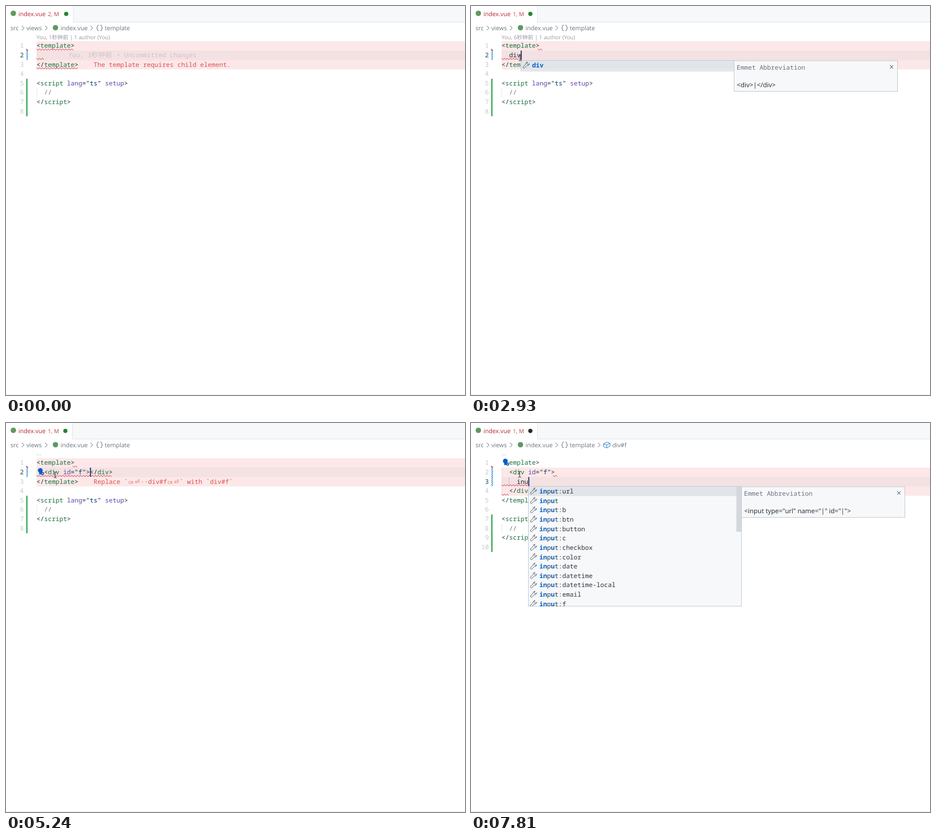
These frames come from a looping animation (812 px wide and 690 px high, 8000 ms). An HTML page:

```html
<!DOCTYPE html>
<html lang="en">
<head>
<meta charset="utf-8">
<title>Typing an abbreviation in an editor</title>
<style>
html, body { margin: 0; width: 100%; height: 100%; overflow: hidden; background: #fff; }
svg { display: block; width: 812px; height: 690px; text-rendering: geometricPrecision; }
text { white-space: pre; }
.code { font: 11.23px "Noto Sans Mono", "Noto Sans CJK SC", monospace; fill: #24292e; }
.ui { font: 10.7px "Open Sans", "Noto Sans CJK SC", sans-serif; fill: #6a737d; }
.tag { fill: #1b7040; } .attr { fill: #5f45b0; } .str { fill: #032f62; } .note { fill: #6a737d; }
.hit { fill: #005cc5; font-weight: 700; }
</style>
</head>
<body>
<svg id="stage" viewBox="0 0 812 690"></svg>
<script>
const LOOP = 8000, LEFT = 54, CW = 6.738, LH = 16.63;
const X = col => LEFT + col * CW;
const Y = row => 62.5 + (row - 1) * LH;
const base = row => Math.round(Y(row) + 11.8);
const esc = s => s.replace(/</g, '&lt;');

const rect = (x, y, w, h, fill, more = '') =>
  `<rect x="${x}" y="${y}" width="${w}" height="${h}" fill="${fill}" ${more}/>`;
const line = (d, stroke, w = 1) => `<path d="${d}" fill="none" stroke="${stroke}" stroke-width="${w}"/>`;
const dot = (x, y, r, fill) => `<circle cx="${x}" cy="${y}" r="${r}" fill="${fill}"/>`;
const text = (x, y, s, cls, more = '') => `<text x="${x}" y="${y}" class="${cls}" ${more}>${s}</text>`;
const ink = (color, size) => `style="fill:${color}${size ? `;font-size:${size}px` : ''}"`;

// Suggestion lists
const D_ITEMS = 'div dd del details dfn dialog dir dl dt data datalist doc disabled'.split(' ');
const KINDS = ' b btn button c checkbox color date datetime datetime-local email f'.split(' ');
const IN_ITEMS = KINDS.map(k => k ? 'input:' + k : 'input');
const URL_ITEMS = ['input:url', ...IN_ITEMS];
const list = (col, hits, items, detail) => ({ col, hits, items, detail });
const D_DETAIL = '<div>|</div>', IN_DETAIL = '<input type="text" name="|" id="|">';
const inner = s => ['  <div id="f">', '    ' + s, '  </div>'];

const start = {
  body: ['  '], row: 2, col: 2, on: 0, err: 'child', fix: 'div', badge: '2, M', dotX: 106.5,
  dotInk: '#25803a', lens: 'You, 1秒钟前 | 1 author (You)', blame: 1, mod: 1, bulb: 0, crumb: 0, pop: null
};
const steps = [
  [70, { on: 1 }], [510, { on: 0 }], [1040, { on: 1 }], [1510, { on: 0 }],
  [2060, { on: 1, lens: 'You, 6秒钟前 | 1 author (You)' }],
  [2520, { body: ['  d'], col: 3 }],
  [2660, { pop: list(3, 'd', D_ITEMS, D_DETAIL) }],
  [2730, { body: ['  di'], col: 4, blame: 0 }],
  [2800, { pop: list(4, 'di', D_ITEMS, D_DETAIL) }],
  [2860, { body: ['  div'], col: 5, pop: list(5, 'div', ['div'], D_DETAIL) }],
  [2930, { err: 'replace', badge: '1, M', dotX: 105 }],
  [3210, { bulb: 2 }], [3400, { on: 0 }], [3460, { lens: '...' }],
  [3790, { body: ['  div#'], col: 6, on: 1, pop: null }],
  [3860, { fix: 'div#' }], [4260, { on: 0 }],
  [4450, { body: ['  div#f'], col: 7, on: 1 }],
  [4520, { fix: 'div#f', pop: list(7, 'div#f', ['div#f'], '<div id="f">|</div>') }],
  [4910, { on: 0 }],
  [5240, { body: ['  <div id="f"></div>'], col: 14, on: 1, pop: null }],
  [5380, { err: '', badge: 'M', dotX: 95.5, dotInk: '#24292e' }],
  [5580, { bulb: 0 }], [5640, { crumb: 1 }], [5710, { on: 0 }], [6190, { on: 1 }],
  [6390, { body: inner(''), row: 3, col: 4 }],
  [6620, { err: 'delete', badge: '1, M', dotX: 105, mod: 2 }], [6870, { on: 0 }],
  [7090, { body: inner('i'), col: 5, on: 1 }],
  [7150, { pop: list(5, 'i', IN_ITEMS, IN_DETAIL) }],
  [7210, { body: inner('in'), col: 6 }],
  [7270, { pop: list(6, 'in', IN_ITEMS, IN_DETAIL) }],
  [7470, { body: inner('inu'), col: 7 }],
  [7540, { pop: list(7, 'inu', URL_ITEMS, '<input type="url" name="|" id="|">') }],
  [7810, { bulb: 1 }]
];
const stateAt = t => Object.assign({}, start, ...steps.filter(s => s[0] <= t).map(s => s[1]));

// Pointer path: time, x, y
const path = [[70, 719, 671], [450, 360, 420], [820, 105, 239], [1150, 97, 140], [1360, 84, 84],
  [1510, 82, 89], [1660, 87, 92], [7000, 87, 92], [7090, 86, 91], [8000, 86, 91]];
function pointer(t) {
  if (t < 70) return '';
  const now = t < 1660 ? 70 + Math.floor((t - 70) / 75) * 75 : t;
  const i = Math.max(1, path.findIndex(p => p[0] >= now));
  const [a, b] = [path[i - 1], path[i]];
  const k = (now - a[0]) / (b[0] - a[0]);
  const x = a[1] + (b[1] - a[1]) * k, y = a[2] + (b[2] - a[2]) * k;
  return line(`M${x - 2.5} ${y - 5}h2l.5.5.5-.5h2M${x} ${y - 4.5}v9M${x - 2.5} ${y + 5}h2l.5-.5.5.5h2`, '#24292e');
}

const paint = s => esc(s).replace(/(&lt;\/?)(\w+)|("[^"]*")|(\/\/)|\b(lang|id|setup)\b/g,
  (all, open, tag, str, note) => {
    const span = (c, v) => `<tspan class="${c}">${v}</tspan>`;
    return tag ? open + span('tag', tag) : span(str ? 'str' : note ? 'note' : 'attr', all);
  });

function zigzag(row, from, to) {
  const y = Y(row) + 14.8;
  let d = '', up = 1;
  for (let x = X(from); x <= X(to); x += 2.6, up = !up) d += `${d ? 'L' : 'M'}${x} ${up ? y - 1.2 : y + 1.2}`;
  return line(d, '#d73a49');
}

// Error text, with carriage-return and line-feed marks drawn for "~"
function message(x, y, s) {
  const red = '#de5050';
  return s.split('~').map((part, i) => {
    let out = '';
    if (i) {
      out = text(x + 1, y, 'CR', 'ui', ink(red, 6.8)) +
        text(x + 12, y, '⏎', 'code', `style="fill:${red};font:10.5px 'DejaVu Sans',sans-serif"`);
      x += 22;
    }
    out += text(x, y, esc(part), 'code', ink(red));
    x += part.length * CW;
    return out;
  }).join('');
}

const chevron = x => line(`M${x - 2} 35l4 4-4 4`, '#6a737d');

function header(s) {
  const end = s.dotX + 13, red = s.err !== '';
  let out = rect(0, 0, 812, 28.5, '#f6f8fa') + rect(0, 0, end, 29, '#fff') +
    line(`M${end - .5} 0V28.5H812`, '#e1e4e8') +
    dot(13, 13, 4.8, '#5d9a62') +
    text(22, 18, 'index.vue', 'ui', ink(red ? '#b92531' : '#0d55a5')) +
    text(74, 18, s.badge, 'ui', ink(red ? '#c93a45' : '#3f86cc', 10)) +
    dot(s.dotX, 14, 3.7, s.dotInk);
  out += text(8, 43, 'src', 'ui') + chevron(30) + text(36, 43, 'views', 'ui') + chevron(71) +
    dot(87.5, 38.5, 4.8, '#5d9a62') + text(96.5, 43, 'index.vue', 'ui') + chevron(151.5) +
    line('M164 34h-1q-1.5 0-1.5 1.5v2q0 1.3-1.5 1.3 1.5 0 1.5 1.3v2q0 1.5 1.5 1.5h1' +
      'M167 34h1q1.5 0 1.5 1.5v2q0 1.3 1.5 1.3-1.5 0-1.5 1.3v2q0 1.5-1.5 1.5h-1', '#6a737d') +
    text(174.7, 43, 'template', 'ui');
  if (s.crumb) out += chevron(226.5) + line('M234.5 37l6-3 5.5 2v5l-6 3.3-5.5-2.3zl5.5 2 6-3M240 39v5', '#3d83c4') +
    text(250, 43, 'div#f', 'ui');
  return out + text(LEFT, s.lens === '...' ? 57 : 59, s.lens, 'ui', ink('#949aa1', 9.7));
}

function errors(s, lines) {
  const first = s.err === 'delete' ? 2 : 1, edited = first + 1, last = first + 2;
  const size = lines[edited - 1].length, edge = lines[first - 1].length;
  const note = {
    child: 'The template requires child element.',
    replace: 'Replace `~··' + s.fix + '~` with `' + s.fix + '`',
    delete: 'Delete `~····~··`'
  }[s.err];
  const whole = s.err === 'child';
  return zigzag(first, whole ? 0 : edge - .5, whole ? edge : edge + .7) + zigzag(edited, 0, size) +
    (whole ? zigzag(last, 0, 11) : '') + (first === 2 ? zigzag(last, 0, 2) : '') +
    message(X(lines[last - 1].length + 4), base(last), note);
}

function blame(x, y) {
  const pale = '#d3c1c5';
  return text(x, y, 'You, 3', 'code', ink(pale)) + text(x + 40.5, y, '秒钟前', 'code', ink(pale, 12.2)) +
    text(x + 85, y, '• Uncommitted changes', 'code', ink(pale));
}

function bulb(row) {
  const y = Y(row) + 5, blue = '#005cc5';
  return (row === 1 ? rect(LEFT, Y(1), 13, 15, '#fff') : '') + dot(60.7, y, 4.2, blue) +
    rect(58.8, y + 3, 3.6, 4, blue) + dot(64.6, y + 5.3, 2.8, blue) + dot(64.6, y + 5.3, 1, '#fff');
}

function popup({ col, hits, items, detail }, row) {
  const x = Math.round(X(col)) + .5, y = Math.round(Y(row + 1)) + .5;
  const h = Math.min(212.5, items.length * LH + 2), edge = 'stroke="#c6cbd1"';
  const mark = s => {
    let n = 0;
    return [...s].map(c => c === hits[n] ? (n++, `<tspan class="hit">${c}</tspan>`) : c).join('');
  };
  const rows = items.map((s, i) => {
    const cy = y + 8.7 + i * LH;
    return `<path transform="translate(${x + 8.5} ${cy - .6}) scale(.85)" fill="none" stroke="#444d56"
      d="M-5 3l5-5a3.4 3.4 0 0 1 4-4l-2 2 1 2 2 1 2-2a3.4 3.4 0 0 1-4.5 4l-5 5a1.6 1.6 0 0 1-2.5-3z"/>` +
      text(x + 19.5, Math.round(cy + 3.9), mark(s), 'code', ink('#2f363d'));
  }).join('');
  return rect(x, y, 377, h, '#f6f8fa', edge) + rect(x + .5, y + .5, 376, 16.6, '#e1e5ea') +
    `<clipPath id="view">${rect(x, y, 376.5, h, '#000')}</clipPath><g clip-path="url(#view)">${rows}</g>` +
    (h > 200 ? rect(x + 368, y + .5, 8.5, 80, '#d4d8dc') : '') +
    rect(x + 377, y + .5, 289, 54.5, '#f6f8fa', edge) +
    text(x + 381.5, y + 16.5, 'Emmet Abbreviation', 'code', ink('#6a737d')) +
    line(`M${x + 652.5} ${y + 8.5}l6 6m0-6l-6 6`, '#444d56') +
    text(x + 382, y + 47.5, esc(detail), 'ui', ink('#24292e', 11.5));
}

function draw(t) {
  const s = stateAt(t);
  const lines = ['<template>', ...s.body, '</template>', '', '<script lang="ts" setup>', '  //', '<\/script>', ''];
  const many = s.body.length > 1, count = lines.length;
  let out = `<pattern id="hatch" width="3" height="3.4" patternUnits="userSpaceOnUse">
    <path d="M0-.4L3 2.2M0 3L3 5.6M0-3.8L3-1.2" stroke="#2b8de0" stroke-width="1.5"/></pattern>`;
  out += header(s);

  if (s.err) out += rect(LEFT, Y(s.row - 1), 758, LH * 3, '#fce8e8');
  out += rect(LEFT, Y(s.row), 758, LH, s.err ? '#f3e1e3' : '#f5f8fa');

  const guide = (col, row, n, color) => rect(Math.floor(X(col)), Y(row), 1, LH * n, color);
  out += guide(0, count - 2, 1, '#e6eaee');
  if (many) out += guide(0, 2, 3, s.err ? '#f0dcde' : '#d6dade');
  if (many && s.err) out += guide(2, 3, 1, '#d0c4c8');

  const top = Y(count - 3);
  out += rect(36, top, 1.9, LH * 4, '#189a3c') + rect(36, Y(2), 3, LH * s.mod, 'url(#hatch)') +
    '<path d="M35.8 75.2l3.6 3.8h-3.6z" fill="#d73a49"/>';

  lines.forEach((code, i) => {
    const y = base(i + 1);
    out += text(31.5, y, i + 1, 'code', `text-anchor="end" ${ink(i + 1 === s.row ? '#24454a' : '#c3c8cd')}`) +
      text(LEFT, y, paint(code), 'code');
  });

  if (s.blame) out += blame(X(s.body[0].length + 6.4), base(2));
  if (s.err) out += errors(s, lines);
  if (s.bulb) out += bulb(s.bulb);
  if (s.on) out += rect(X(s.col) + .2, Y(s.row), 1.8, LH - .4, '#12345a');
  if (s.pop) out += popup(s.pop, s.row);
  return out + pointer(t) + rect(0, 689, 812, 1, '#eceef0');
}

const stage = document.getElementById('stage');
let shown = '';
function tick() {
  const next = draw(performance.now() % LOOP);
  if (next !== shown) stage.innerHTML = shown = next;
  requestAnimationFrame(tick);
}
tick();
</script>
</body>
</html>
```
